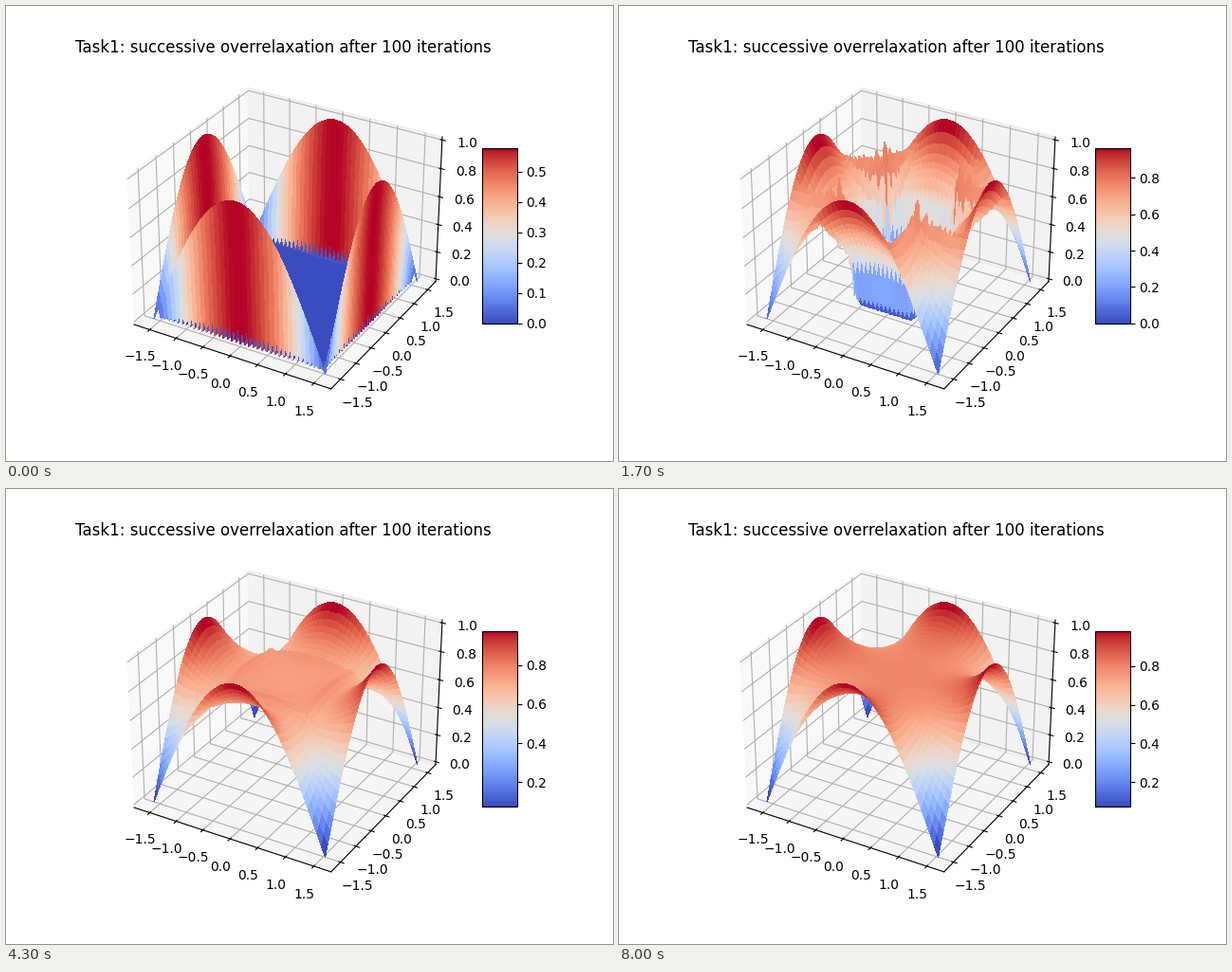
Animation of 640x480 px, one loop 8.1 s. Source, as a matplotlib script:

```python
import numpy as np
import matplotlib.pyplot as plt
from matplotlib.animation import FuncAnimation

POINTS = 81
FRAMES = 81
INTERVAL = 100


def relax(axis, sweeps):
    """Red-black overrelaxation of Laplace's equation, Chebyshev accelerated."""
    n = len(axis)
    u = np.zeros((n, n))
    edge = np.cos(axis)
    u[0] = u[-1] = edge
    u[:, 0] = u[:, -1] = edge

    i, j = np.indices((n - 2, n - 2))
    rho2 = np.cos(np.pi / (n - 1)) ** 2
    omega = 1.0
    states = []
    for sweep in range(sweeps):
        for colour in (0, 1):
            inner = u[1:-1, 1:-1]
            mean = (u[:-2, 1:-1] + u[2:, 1:-1] + u[1:-1, :-2] + u[1:-1, 2:]) / 4
            mask = (i + j) % 2 == colour
            inner[mask] += omega * (mean - inner)[mask]
            first = sweep == 0 and colour == 0
            omega = 1 / (1 - rho2 / 2) if first else 1 / (1 - rho2 * omega / 4)
        states.append(u.copy())
    return states


axis = np.linspace(-np.pi / 2, np.pi / 2, POINTS)
X, Y = np.meshgrid(axis, axis)
states = relax(axis, FRAMES)

fig = plt.figure(figsize=(6.4, 4.8), dpi=100)
ax = fig.add_subplot(projection="3d")
ax.set_title("Task1: successive overrelaxation after 100 iterations")

# Data margin of 5 % plus a pane margin of 1/48 on each side
half = np.pi / 2 * 1.1 * 25 / 24
ax.set_xlim(-half, half)
ax.set_ylim(-half, half)
ax.set_zlim(-1 / 48, 1 + 1 / 48)


def add_surface(z):
    surface = ax.plot_surface(X, Y, z, cmap="coolwarm", linewidth=0,
                              antialiased=False)
    surface.autoscale_None()
    return surface


colorbar = fig.colorbar(add_surface(states[0]), ax=ax, shrink=0.5, aspect=5)


def draw(frame):
    for old in list(ax.collections):
        old.remove()
    colorbar.update_normal(add_surface(states[frame]))
    return []


anim = FuncAnimation(fig, draw, frames=FRAMES, interval=INTERVAL,
                     repeat=True, repeat_delay=0)
plt.show()
```
